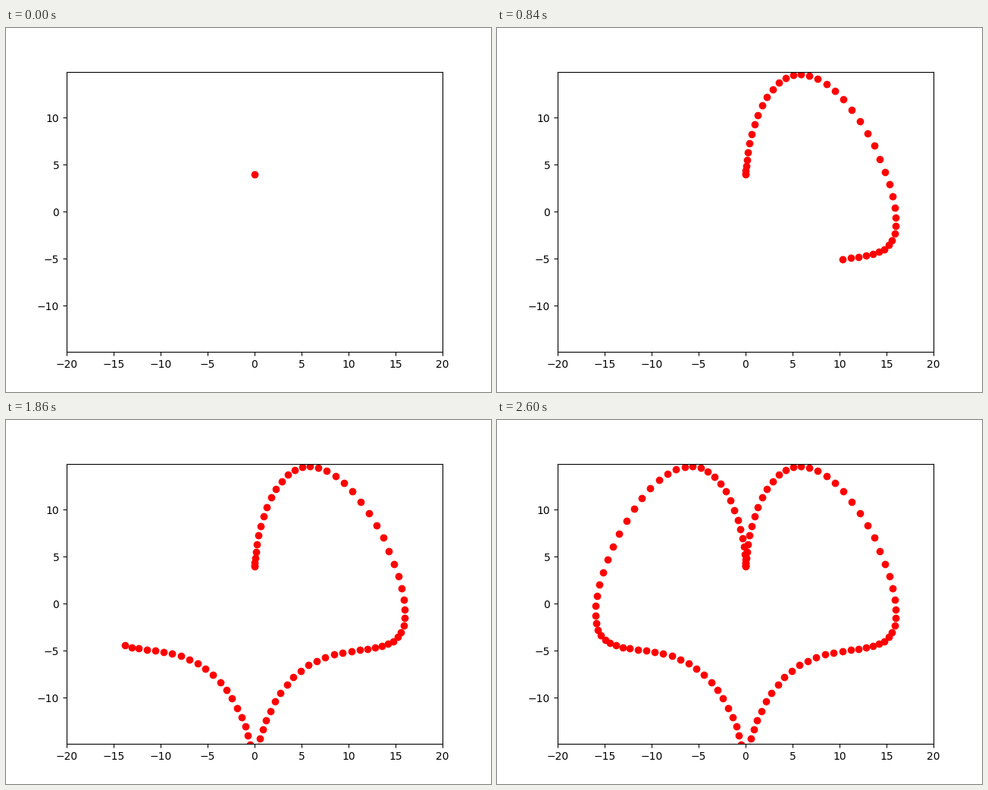
Animation, 640 px wide and 480 px high, one loop 2.62 s. Source, as a matplotlib script:

```python
import numpy as np
import matplotlib.pyplot as plt
from matplotlib.animation import FuncAnimation

STEP = 0.05       # parameter step between dots
INTERVAL = 20     # ms
PAUSE_AT = 57     # dot index where the curve pauses below the axes
PAUSE = 5         # pause length in frames

t = np.arange(0, 2 * np.pi, STEP)
x = 16 * np.sin(t) ** 3
y = 13 * np.cos(t) - 3 * np.cos(2 * t) - 2 * np.cos(3 * t) - 4 * np.cos(4 * t)

fig, ax = plt.subplots(figsize=(6.4, 4.8), dpi=100)
ax.set_xlim(-20, 20)
half = 20 * (4.8 * 0.77) / (6.4 * 0.775)   # equal scale on both axes
ax.set_ylim(-half, half)
dots, = ax.plot([], [], "ro")


def update(n):
    last = min(n, max(PAUSE_AT, n - PAUSE))
    dots.set_data(x[:last + 1], y[:last + 1])
    return dots,


anim = FuncAnimation(fig, update, frames=len(t) + PAUSE, interval=INTERVAL,
                     repeat=True, repeat_delay=0)
plt.show()
```
